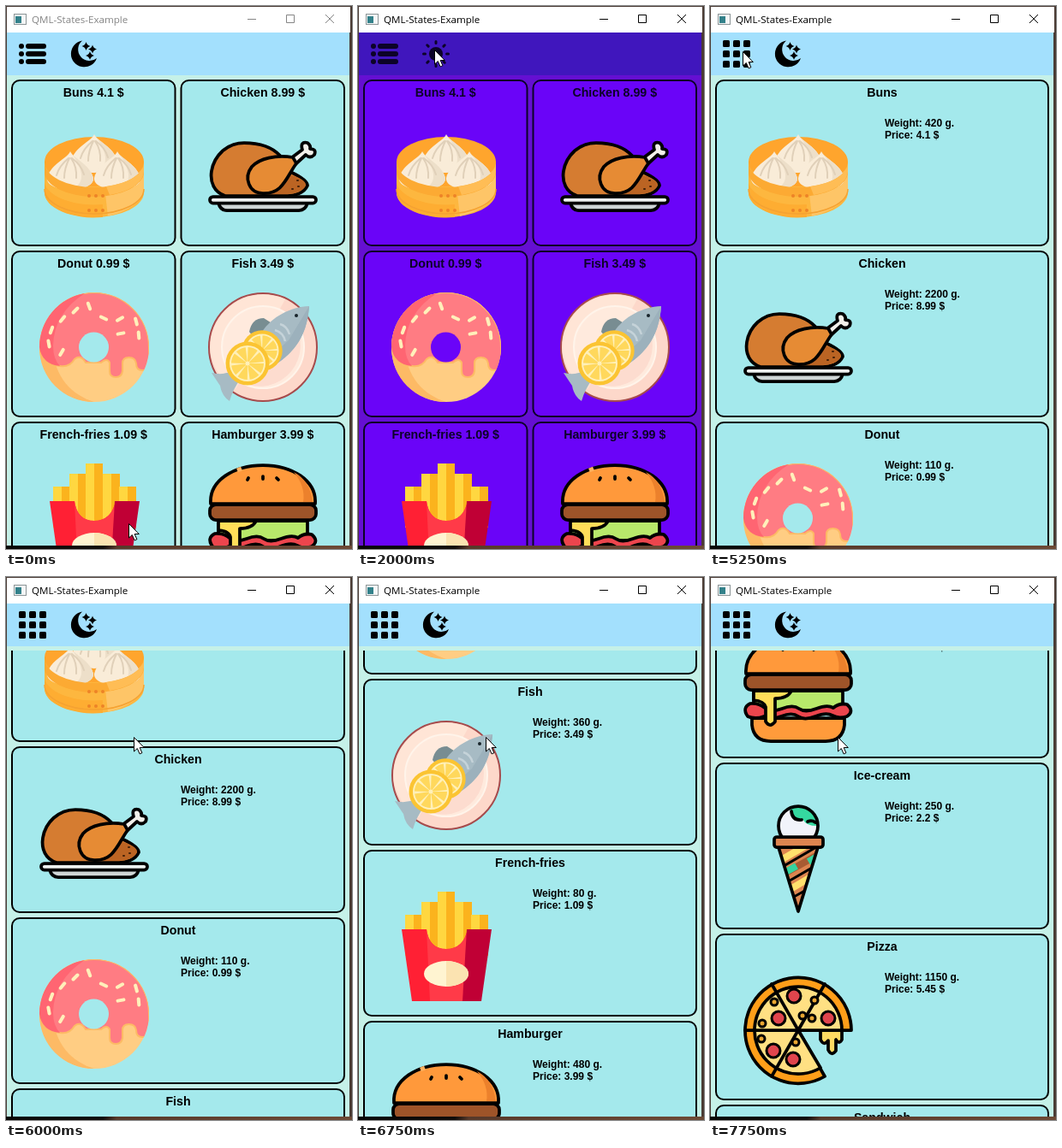
These frames come from a looping animation (404 px wide and 635 px high, 8000 ms). An HTML page:

```html
<!DOCTYPE html>
<html lang="en">
<head>
<meta charset="utf-8">
<title>QML-States-Example</title>
<style>
  html, body { margin: 0; width: 100%; height: 100%; overflow: hidden; background: #4a3b34; }
  svg { display: block; }
  #app { --bar: #a3e0fd; --page: #c5f1e8; --card: #a4e9ec; --ink: #000; --chrome: #000; }
  #app.dark { --bar: #4016bd; --page: #650fd2; --card: #6a04f8; --ink: #0c0328; }
  #app.idle { --chrome: #858585; }
  .bar { fill: var(--bar); }
  .page { fill: var(--page); }
  .ink { fill: var(--ink); }
  .hole { fill: var(--card); }
  .frame { fill: var(--card); stroke: var(--ink); stroke-width: 2; }
  .rays { stroke: var(--ink); stroke-width: 3; stroke-linecap: round; }
  .chrome { fill: none; stroke: var(--chrome); }
  .caption { fill: var(--chrome); font: 11.6px "Open Sans", "Noto Sans", sans-serif; }
  .name, .info { fill: var(--ink); font-family: "Liberation Sans", Arial, sans-serif; font-weight: bold; }
  .name { font-size: 14.2px; text-anchor: middle; }
  .info { font-size: 12px; }
  .line { stroke: #000; stroke-width: 3.75; stroke-linejoin: round; stroke-linecap: round; }
  .hide { display: none; }
</style>
</head>
<body>
<svg id="app" width="404" height="635" viewBox="0 0 404 635">
  <defs>
    <clipPath id="view"><rect x="1" y="86" width="400" height="545"/></clipPath>
    <linearGradient id="desk">
      <stop offset="0" stop-color="#080706"/><stop offset=".28" stop-color="#100c0a"/>
      <stop offset=".32" stop-color="#57392a"/><stop offset="1" stop-color="#6d4a36"/>
    </linearGradient>
    <clipPath id="disc"><circle cx="64" cy="64" r="64"/></clipPath>
    <clipPath id="cone"><path d="M41 50H87L64 125Z"/></clipPath>
    <clipPath id="scoop"><circle cx="64" cy="25" r="23"/></clipPath>

    <g id="bun">
      <path d="M0 0C-3 8-23 15-27 31C-28 41-11 45 0 45S28 41 27 31C23 15 3 8 0 0Z" fill="#f9ecd8"/>
      <path d="M0 0C3 8 23 15 27 31C28 41 11 45 0 45C17 39 18 24 0 0Z" fill="#eddfc9"/>
      <path d="M-2 8Q-13 17-16 28M-1 8Q-7 20-7 31M1 8Q8 18 7 31M2 8Q13 16 16 27" fill="none" stroke="#e0d0b9" stroke-width="2" stroke-linecap="round"/>
    </g>

    <g id="Buns">
      <path d="M6 47V83A58 29 0 0 0 122 83V47Z" fill="#fdb73f"/>
      <path d="M76 76Q106 73 122 53V83Q116 101 80 111Z" fill="#fec567"/>
      <path d="M6 72A58 29 0 0 0 74 97V112A58 29 0 0 1 6 83Z" fill="#fead32"/>
      <ellipse cx="64" cy="47" rx="58" ry="29" fill="#ffa52d"/>
      <path d="M6 79A58 29 0 0 0 122 79" fill="none" stroke="#f5a232" stroke-width="1.5"/>
      <use href="#bun" x="64" y="15"/>
      <use href="#bun" x="36" y="35"/>
      <use href="#bun" x="91" y="35"/>
      <path d="M6 48A58 29 0 0 0 122 48V59A58 29 0 0 1 6 59Z" fill="#fcaa33"/>
      <path d="M78 76A58 29 0 0 0 122 49V59A58 29 0 0 1 82 86Z" fill="#ffbd55"/>
      <path d="M58 87H75M58 104H75" stroke="#ed8327" stroke-width="4" stroke-linecap="round" stroke-dasharray="0 8"/>
    </g>

    <g id="Chicken" class="line">
      <path d="M12 95Q14 104 22 104H106Q114 104 116 95Z" fill="#cfd6d6"/>
      <rect x="2" y="88" width="124" height="7.5" rx="3.75" fill="#eef2f1"/>
      <path d="M40 95.5H108" stroke-width="3"/>
      <path d="M20 87C7 83 2 71 4 58C7 40 22 25 42 25C60 25 75 30 84 40L96 59C109 65 116 70 116 75C112 84 101 87 93 87Z" fill="#d57c31"/>
      <path d="M93 62C107 65 115 70 114 75C110 83 99 85 90 85H70C82 82 88 72 93 62Z" fill="#bb6423" stroke="none"/>
      <path d="M94 45L110 33Q107 23 116 25Q120 28 119 32Q127 32 124 39Q119 44 114 39L101 51Z" fill="#f2f0ea"/>
      <path d="M99 42C79 39 60 43 51 53C41 66 48 84 64 84C87 85 91 66 103 49Z" fill="#e68b34"/>
      <path d="M105 76H106M98 79H99M104 69H105" stroke="#432009" stroke-width="2"/>
    </g>

    <g id="Donut">
      <circle cx="64" cy="64" r="64" fill="#ffcd83"/>
      <path d="M0 64C0 100 28 128 64 128C38 120 17 99 16 64Z" fill="#fdba65"/>
      <path d="M0 64A64 64 0 0 1 128 64V83Q127 91 120 91Q113 91 113 83Q112 76 104.500 76Q97 76 97 83V92Q96 99 89.500 99Q82 99 82 92V82Q79 76 72 82H54Q48 72 41 78Q35 88 24 86Q3 84 0 64Z" fill="#ff7c83" stroke="#fdba65" stroke-width="2" clip-path="url(#disc)"/>
      <path d="M0 64A64 64 0 0 1 53 1Q17 24 16 62Q16 78 24 86Q3 84 0 64Z" fill="#ff6572"/>
      <circle class="hole" cx="63.5" cy="64" r="17.5"/>
      <path id="sprinkles" stroke="#fff0ba" stroke-width="4" stroke-linecap="round"/>
    </g>

    <g id="lemon">
      <circle r="25.5" fill="#fbc432"/><circle r="21" fill="#fff0b8"/>
      <circle r="10.5" fill="none" stroke="#ffd85c" stroke-width="17" stroke-dasharray="6.6 1.65"/>
      <circle r="2.5" fill="#fff0b8"/>
    </g>

    <g id="Fish">
      <circle cx="64" cy="64" r="63" fill="#fdd8ca" stroke="#a64b4c" stroke-width="2"/>
      <path d="M3 73A62 62 0 0 1 90 8L32 113Q11 103 3 73Z" fill="#ffe5d6"/>
      <circle cx="64" cy="64" r="48" fill="#ffeadd" stroke="#fff4ea" stroke-width="2"/>
      <path d="M93 27A48 48 0 0 1 47 108Z" fill="#fddccf"/>
      <path d="M48 46Q51 30 65 30L76 37L56 56Z" fill="#788d92"/>
      <path d="M118 16C96 17 75 28 63 46L28 92Q17 97 4 94Q10 103 14 109Q16 121 25 127Q29 113 38 101L82 82C105 66 116 45 118 16Z" fill="#a7bbc4"/>
      <path d="M118 16C116 45 105 66 82 82L47 98L94 56Z" fill="#9cb1bc"/>
      <path d="M84 37Q92 39 95 49M78 44Q88 47 90 57M72 51Q81 54 84 64" fill="none" stroke="#c5d3d9" stroke-width="2.5"/>
      <circle cx="103" cy="27" r="2" fill="#18242b"/>
      <use href="#lemon" transform="translate(63 68) scale(.93)"/>
      <use href="#lemon" x="46" y="83"/>
    </g>

    <g id="French-fries">
      <g id="sticks"></g>
      <path d="M12 44H41Q44 67 64 67T89 44H96V128H24Z" fill="#ff2034"/>
      <path d="M41 44Q44 67 64 67T89 44V128H45Z" fill="#ff3a48"/>
      <path d="M88 44H117L105 128H83Z" fill="#c00035"/>
      <ellipse cx="64" cy="96" rx="26" ry="15" fill="#fff4d1"/>
      <path d="M64 81A26 15 0 0 1 64 111Z" fill="#fbe3b1"/>
    </g>

    <g id="Hamburger" class="line">
      <path d="M10 99H118V107Q116 126 96 126H32Q12 126 10 107Z" fill="#ff9b3b"/>
      <path d="M12 67H116V90H12Z" fill="#b8e96b"/>
      <path d="M8 82Q18 81 25 87T45 88T65 88T85 88T105 87Q112 81 121 83Q130 91 121 97Q111 100 104 96T84 97T64 97T44 97T24 97Q14 101 5 97Q-2 87 8 82Z" fill="#ec454d"/>
      <path d="M12 67H56Q52 76 37 76V103Q31 111 26 103V86Q24 79 12 78Z" fill="#ffde59"/>
      <rect x="2" y="48" width="124" height="18" rx="7" fill="#9e5429"/>
      <path d="M3 47C1 20 30 2 64 2S127 20 125 47Z" fill="#ff993b"/>
      <path d="M100 10Q119 20 122 45H111Q114 27 100 10Z" fill="#ec812c" stroke="none"/>
      <path d="M47 17L46 19M64 15V18M80 17L82 19"/>
      <path d="M34 8L39 6" stroke="#ffb15f" stroke-linecap="butt" stroke-width="5"/>
    </g>

    <g id="Ice-cream">
      <circle cx="64" cy="25" r="23" fill="#f1f3fa"/>
      <g clip-path="url(#scoop)">
        <path d="M54 0Q54 20 70 18Q73 26 90 25V0Z" fill="#35d8a0"/>
        <path d="M78 4Q92 22 80 45H94V0Z" fill="#18b98b" opacity=".6"/>
      </g>
      <path d="M41 50H87L64 125Z" fill="#dd8550"/>
      <g clip-path="url(#cone)" stroke-width="8">
        <path d="M35 70L73 48M45 105L90 78" stroke="#ffe06d"/>
        <path d="M35 88L92 56" stroke="#a85b32"/>
        <path d="M44 82L62 72M76 67L91 58" stroke="#34d49f"/>
        <path d="M35 79L90 47M42 96L92 67M50 113L84 94" stroke="#000" stroke-width="3"/>
      </g>
      <g class="line" fill="none">
        <circle cx="64" cy="25" r="23"/>
        <path d="M41 50H87L64 125Z"/>
        <path d="M56 8Q57 19 68 18M75 20Q80 18 84 21"/>
        <rect x="36" y="38" width="57" height="12" rx="3" fill="#dd8550"/>
      </g>
    </g>

    <g id="Pizza">
      <path class="line" d="M90 64H115V75Q112 81 108 75V88Q103 95 99 87V76Q94 83 90 75Z" fill="#ffda62"/>
      <path class="line" d="M64 64H126A62 62 0 1 0 95 118Z" fill="#ff9e19"/>
      <path class="line" d="M64 64H115A51 51 0 1 0 90 108Z" fill="#ffe083" stroke-width="3"/>
      <path class="line" d="M64 64L95 10M64 64L33 10M2 64H64L33 118" fill="none"/>
      <g id="toppings" stroke="#000" stroke-width="3"></g>
    </g>
  </defs>

  <rect width="404" height="635" fill="#4a3b34"/>
  <rect y="631" width="404" height="4" fill="url(#desk)"/>
  <rect x="1" y="1" width="401" height="30" fill="#fff"/>
  <rect x="9.5" y="9.5" width="14" height="12" fill="#f4f6f6" stroke="#8b9496"/>
  <rect x="11" y="12" width="7" height="8" fill="#33818a"/>
  <text class="caption" x="30" y="20">QML-States-Example</text>
  <path class="chrome" d="M282 15.5H292M327.5 10.5H336.5V19.5H327.5ZM373 10L383 20M383 10L373 20"/>

  <rect class="page" x="1" y="81" width="400" height="550"/>
  <rect class="bar" x="1" y="31" width="400" height="50"/>
  <g id="listIcon" class="ink"></g>
  <g id="gridIcon" class="ink"></g>
  <g id="moon" class="ink">
    <path d="M89 40.500A15.500 15.500 0 1 0 106 61A13 13 0 0 1 89 40.500Z"/>
    <path id="star" d="M0-5Q1-1 5 0Q1 1 0 5Q-1 1-5 0Q-1-1 0-5Z" transform="translate(93.5 47)"/>
    <use href="#star" transform="translate(7.5 3.5)"/>
    <use href="#star" transform="translate(4.5 11)"/>
  </g>
  <g id="sun">
    <circle class="ink" cx="91" cy="56" r="8"/>
    <path id="rays" class="rays"/>
  </g>

  <g clip-path="url(#view)">
    <g id="grid"></g>
    <g id="list"></g>
  </g>
  <path id="cursor" d="M0 0V16.500L3.800 13L6.600 19.400L9.400 18.200L6.700 12H11.800Z" fill="#fff" stroke="#000"/>
</svg>

<script>
const LOOP = 8000, DARK = [2000, 3500], LIST_AT = 5250, FOCUS_AT = 2000;
const LEFT = 6, TOP = 86, ROW = 200, COLUMN = 197.5, GAP = 5;

// time, x, y
const CURSOR = [
  [0, 143.5, 605.5], [250, 85, 392], [500, 98, 122], [750, 92, 53], [1000, 88, 57],
  [1250, 89.5, 51.5], [4000, 86, 51], [4250, 36, 52], [4500, 44, 52], [4750, 38.5, 53.5],
  [5500, 86, 93], [5750, 161, 188], [6000, 149.5, 187.5]
];
// time, offset
const SCROLL = [
  [0, 0], [6000, 88], [6250, 250], [6500, 410], [6750, 567],
  [7000, 710], [7250, 840], [7500, 960], [7750, 1069]
];
const MENU = [
  ["Buns", 420, 4.1], ["Chicken", 2200, 8.99], ["Donut", 110, 0.99],
  ["Fish", 360, 3.49], ["French-fries", 80, 1.09], ["Hamburger", 480, 3.99],
  ["Ice-cream", 250, 2.2], ["Pizza", 1150, 5.45], ["Sandwich", 300, 3.2]
];

const $ = id => document.getElementById(id);
const rect = (x, y, w, h, rx, fill = "") =>
  `<rect x="${x}" y="${y}" width="${w}" height="${h}" rx="${rx}" ${fill && `fill="${fill}"`}/>`;

// Pictures snap to whole pixels.
function card(x, y, w, title, name, extra = "") {
  return `<g transform="translate(${x} ${y})">
    <rect class="frame" x="1" y="1" width="${w - 2}" height="193" rx="9"/>
    <text class="name" x="${w / 2}" y="20">${title}</text>
    <use href="#${name}" x="${Math.round(x + 32.5) - x}" y="49"/>${extra}</g>`;
}

function drawIcons() {
  const rows = [0, 1, 2];
  $("listIcon").innerHTML = rows.map(i =>
    rect(15, 44 + i * 9, 6, 6, 3) + rect(23, 44 + i * 9, 24, 6, 3)).join("");
  $("gridIcon").innerHTML = rows.flatMap(i => rows.map(j =>
    rect(15 + j * 12, 40 + i * 12, 8, 8, 1.5))).join("");
  $("rays").setAttribute("d", [...Array(8).keys()].map(i => {
    const c = Math.cos(i * Math.PI / 4), s = Math.sin(i * Math.PI / 4);
    return `M${91 + 12.5 * c} ${56 + 12.5 * s}L${91 + 14.5 * c} ${56 + 14.5 * s}`;
  }).join(""));
}

function drawFood() {
  // x, y, angle in degrees
  const sprinkles = [
    [14, 44, 110], [27, 31, -50], [11, 60, 80], [26, 70, -60], [42, 21, -45], [58, 16, 70],
    [75, 30, 25], [94, 31, -30], [95, 48, -10], [113, 34, 75], [116, 50, 85]
  ];
  $("sprinkles").setAttribute("d", sprinkles.map(([x, y, deg]) => {
    const a = deg * Math.PI / 180, dx = 3.5 * Math.cos(a), dy = 3.5 * Math.sin(a);
    return `M${x - dx} ${y - dy}L${x + dx} ${y + dy}`;
  }).join(""));

  const sticks = [[16, 27], [35, 12], [54, 0], [74, 12], [93, 27]];
  $("sticks").innerHTML = sticks.map(([x, y]) =>
    rect(x, y, 10, 75 - y, 0, "#ffd740") + rect(x + 10, y, 10, 75 - y, 0, "#fbb31d")).join("");

  const dot = (r, fill) => ([x, y]) => `<circle cx="${x}" cy="${y}" r="${r}" fill="${fill}"/>`;
  const salami = [[59, 24], [41, 50], [99, 50], [35, 88], [58, 98]];
  const olives = [[36, 31], [83, 29], [22, 56], [80, 50], [21, 74], [61, 78], [69, 47]];
  $("toppings").innerHTML =
    salami.map(dot(8, "#e0454d")).join("") + olives.map(dot(4, "#e9a632")).join("");
}

function drawCards() {
  $("grid").innerHTML = MENU.slice(0, 6).map(([name, , price], i) =>
    card(LEFT + i % 2 * COLUMN, TOP + (i >> 1) * ROW, COLUMN - GAP, `${name} ${price} $`, name)
  ).join("");
  $("list").innerHTML = MENU.map(([name, weight, price], i) =>
    card(LEFT, TOP + i * ROW, 2 * COLUMN - GAP, name, name,
      `<text class="info" x="198" y="55">Weight: ${weight} g.</text>
       <text class="info" x="198" y="69">Price: ${price} $</text>`)).join("");
}

const stepAt = (steps, t) => steps.findLast(step => step[0] <= t);
const show = (id, on) => $(id).classList.toggle("hide", !on);

function render(now) {
  const t = now % LOOP;
  const dark = t >= DARK[0] && t < DARK[1];
  const list = t >= LIST_AT;
  const [, x, y] = stepAt(CURSOR, t);
  $("app").classList.toggle("dark", dark);
  $("app").classList.toggle("idle", t < FOCUS_AT);
  show("sun", dark);
  show("moon", !dark);
  show("list", list);
  show("gridIcon", list);
  show("grid", !list);
  show("listIcon", !list);
  $("list").setAttribute("transform", `translate(0 ${-stepAt(SCROLL, t)[1]})`);
  $("cursor").setAttribute("transform", `translate(${x} ${y})`);
}

drawIcons();
drawFood();
drawCards();
const start = performance.now();
const tick = () => {
  render(performance.now() - start);
  requestAnimationFrame(tick);
};
tick();
</script>
</body>
</html>
```
